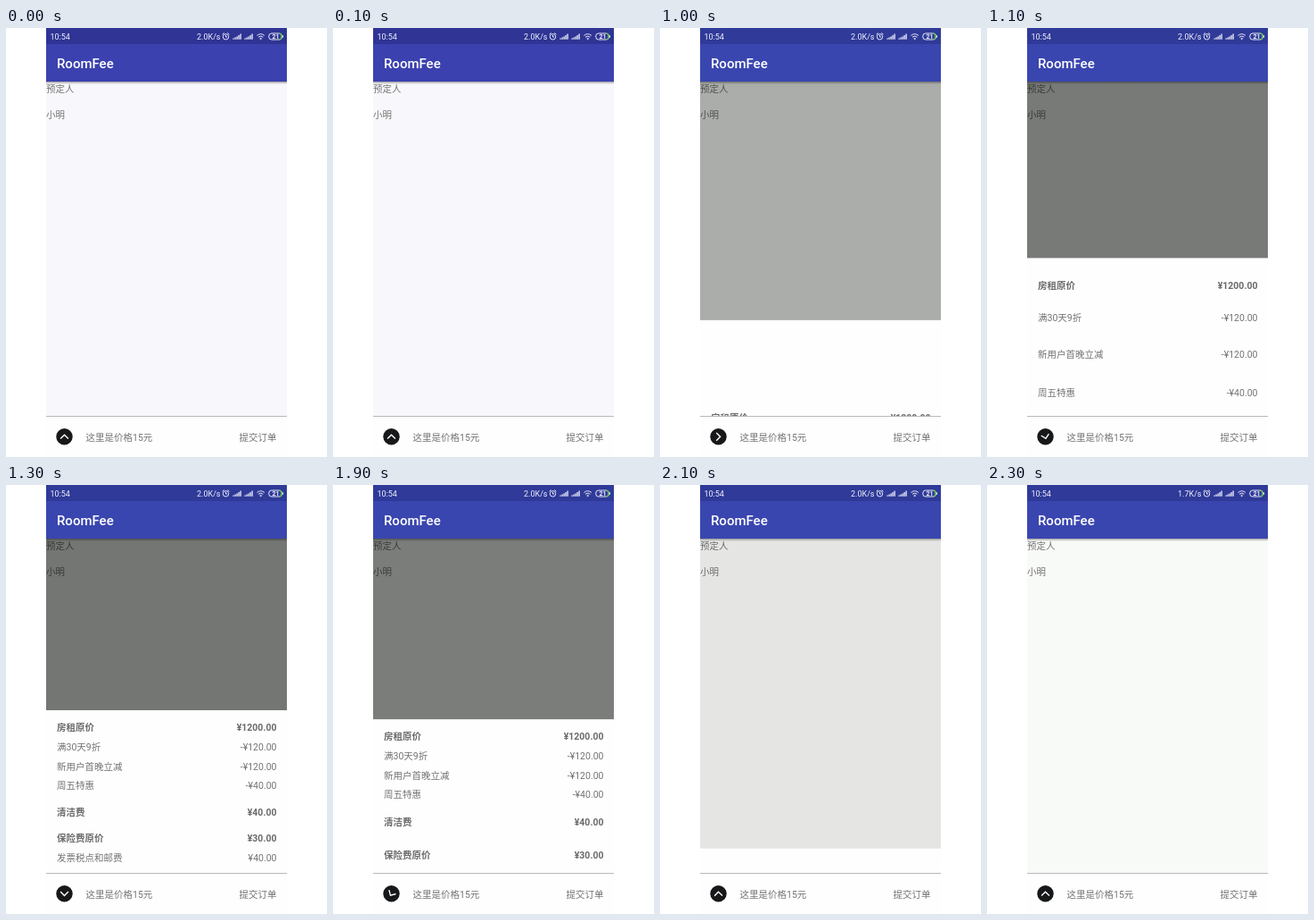
Animation of 360x480 px, one loop 2.4 s. Source, as an HTML page:

```html
<!DOCTYPE html>
<html lang="zh">
<head>
<meta charset="utf-8">
<style>
  html, body { margin: 0; width: 100%; height: 100%; overflow: hidden; background: #fff; }
  svg { display: block; width: 100vw; height: 100vh; }
  text { font: 10.5px Roboto, "Noto Sans CJK SC", "Noto Sans CJK", sans-serif; fill: #737373; }
  .bold { font-weight: 700; fill: #6a6a6a; }
  .title { font-size: 15px; font-weight: 500; fill: #fff; }
  .status { font-size: 9px; fill: #f0f1fa; }
  .end { text-anchor: end; }
</style>
</head>
<body>
<svg viewBox="0 0 360 480">
  <defs>
    <linearGradient id="shade" x2="0" y2="1">
      <stop offset="0" stop-color="#000" stop-opacity=".34"/>
      <stop offset="1" stop-color="#000" stop-opacity="0"/>
    </linearGradient>
    <clipPath id="body"><rect x="45" y="60" width="270" height="374"/></clipPath>
    <path id="bars" d="M.8 12.8v-1.4M2.8 12.8v-2.4M4.8 12.8v-3.4M6.8 12.8v-4.8M8.8 12.8v-6.2" stroke="#e6e8f6" stroke-width="1.4"/>
  </defs>

  <rect id="page" x="45" y="60" width="270" height="374"/>
  <text x="45" y="72">预定人</text>
  <text x="45" y="101">小明</text>

  <g clip-path="url(#body)">
    <rect id="dim" x="45" y="60" width="270" height="374" fill="#020500"/>
    <rect id="panel" x="45" width="270" height="182" fill="#fefefe"/>
    <g id="rows"></g>
  </g>

  <rect x="45" y="60" width="270" height="3" fill="url(#shade)"/>
  <rect id="statusBar" x="45" width="270" height="18"/>
  <rect id="appBar" x="45" y="18" width="270" height="42"/>
  <text class="title" x="57" y="45.2">RoomFee</text>

  <text class="status" x="49.5" y="12.8">10:54</text>
  <text id="speed" class="status end" x="240.5" y="12.8"></text>
  <g fill="none" stroke="#e6e8f6">
    <circle cx="246.5" cy="9.8" r="3.2"/>
    <path d="M246.5 7.8v2.2h1.6M242.6 7.2l2-1.7M250.4 7.2l-2-1.7"/>
    <use href="#bars" x="254.3"/>
    <use href="#bars" x="267.3"/>
    <path d="M281.5 8.4q4.2-3.4 8.4 0M283 10.2q2.7-2.2 5.4 0"/>
    <circle cx="285.7" cy="12" r=".7"/>
    <rect x="294.8" y="6" width="14.4" height="7" rx="3"/>
    <path d="M306.5 6.2q2.7 0 2.7 3.3t-2.7 3.3" stroke="#67c84e" stroke-width="1.3"/>
    <path d="M310.5 8.2v2.6"/>
  </g>
  <text class="status" x="298.6" y="12" style="font-size:7px;font-weight:700">21</text>

  <rect x="45" y="434" width="270" height="46" fill="#fefefe"/>
  <rect x="45" y="434" width="270" height="1" fill="#b9b9b9"/>
  <circle cx="65.5" cy="457.3" r="9.2" fill="#17181a"/>
  <path id="arrow" d="M-4.4 2.3L0-2.1 4.4 2.3" fill="none" stroke="#fff" stroke-width="1.4"/>
  <text x="89.5" y="461.5">这里是价格15元</text>
  <text class="end" x="303.5" y="461.5">提交订单</text>
</svg>
<script>
const LOOP = 2400, STEP = 100, SHEET = 182, BOTTOM = 434;
const $ = id => document.getElementById(id);
const set = (el, attrs) => { for (const k in attrs) el.setAttribute(k, attrs[k]); };

const items = [
  ["房租原价", "¥1200.00", 23, true],
  ["满30天9折", "-¥120.00", 45],
  ["新用户首晚立减", "-¥120.00", 66.5],
  ["周五特惠", "-¥40.00", 88],
  ["清洁费", "¥40.00", 117.5, true],
  ["保险费原价", "¥30.00", 146.5, true],
  ["发票税点和邮费", "¥40.00", 168.5]
];

function addText(parent, str, x, y, cls) {
  const el = document.createElementNS("http://www.w3.org/2000/svg", "text");
  set(el, { x, y, class: cls });
  el.textContent = str;
  parent.append(el);
}

const rows = items.map(([label, price, y, bold]) => {
  const g = document.createElementNS("http://www.w3.org/2000/svg", "g");
  const weight = bold ? "bold" : "";
  addText(g, label, 57, y, weight);
  addText(g, price, 303.5, y, weight + " end");
  $("rows").append(g);
  return g;
});

// Accelerate-decelerate progress from 0 to 1
function ease(t, start, duration) {
  const x = Math.min(1, Math.max(0, (t - start) / duration));
  return (1 - Math.cos(Math.PI * x)) / 2;
}

function draw(time) {
  const t = Math.floor((time % LOOP) / STEP) * STEP;
  const idle = t < 1000, closing = t >= 1900;
  const open = idle ? 0 : closing ? 1 - ease(t, 1849, 336) : ease(t, 833, 300);
  const top = BOTTOM - SHEET * open;
  const turn = idle ? 0 : 180 * (ease(t, 850, 300) + ease(t, closing ? 1820 : LOOP, 300));

  set($("page"), { fill: idle ? "#f8f8fc" : "#f8faf7" });
  set($("statusBar"), { fill: idle ? "#2f3495" : "#2f3a99" });
  set($("appBar"), { fill: idle ? "#3b41ae" : "#3a46af" });
  set($("dim"), { opacity: 0.535 * open });
  set($("panel"), { y: top });
  set($("arrow"), { transform: `translate(65.5 457.3) rotate(${turn})` });

  // Rows enter first to last and leave last to first
  rows.forEach((row, i) => {
    const lag = closing ? ease(t, 1816 + (6 - i) * 34, 336) : 1 - ease(t, 849 + i * 25, 300);
    set(row, { transform: `translate(0 ${top + SHEET * lag})` });
  });
  $("speed").textContent = t >= 2300 ? "1.7K/s" : "2.0K/s";
}

const begin = performance.now();
function tick() {
  draw(performance.now() - begin);
  requestAnimationFrame(tick);
}
tick();
</script>
</body>
</html>
```
